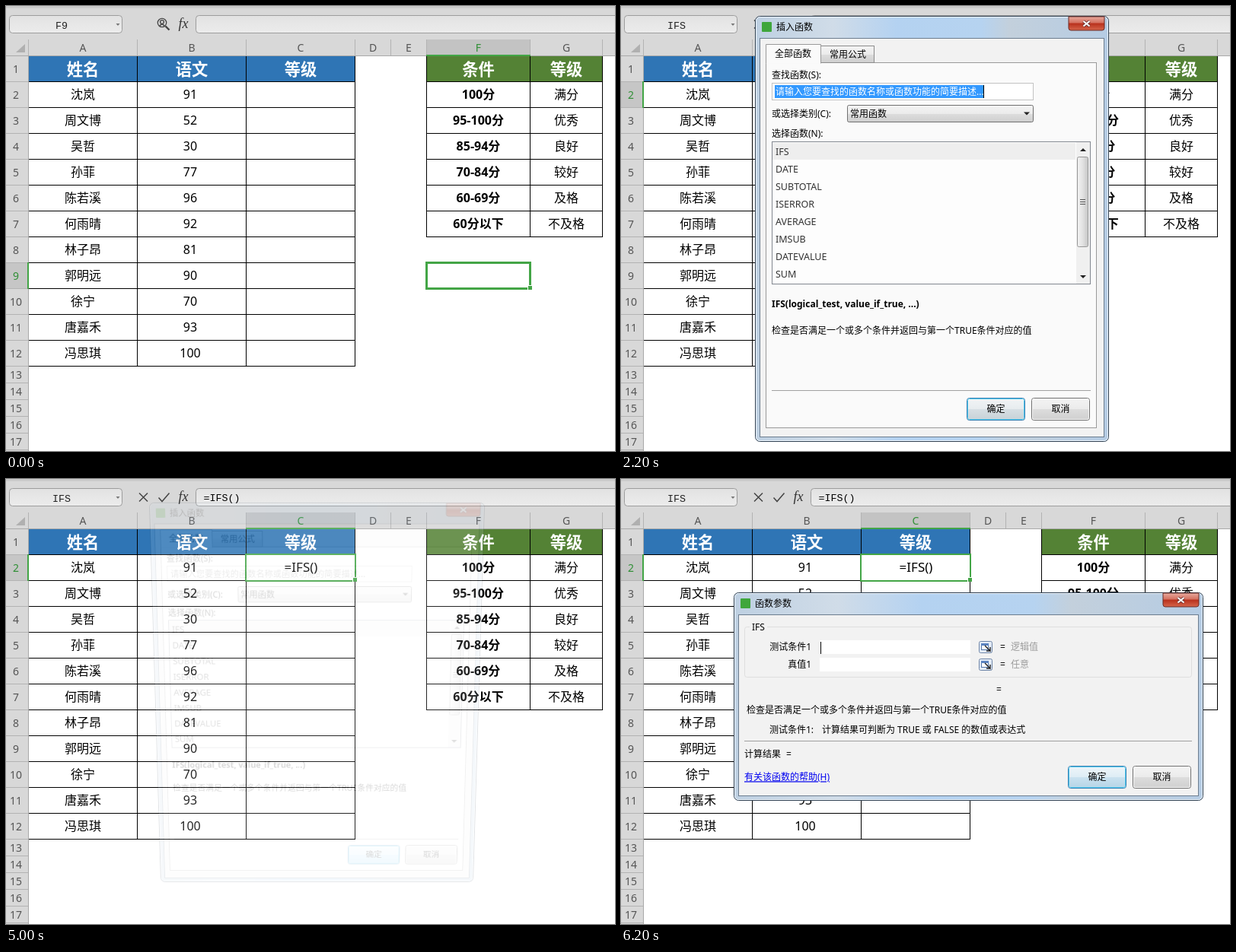
An HTML page for the animation above (6300 ms loop, 800 by 585 pixels).

```html
<!DOCTYPE html>
<html lang="zh-CN">
<head>
<meta charset="utf-8">
<title>IFS</title>
<style>
html, body { margin: 0; width: 100%; height: 100%; overflow: hidden; background: #fff; }
svg { position: absolute; left: 0; top: 0; width: 800px; height: 585px; white-space: pre;
  font-family: "Noto Sans", "Noto Sans CJK SC", "Noto Sans CJK", sans-serif; }
#find { transform-origin: 408.5px 293px; }
#args { transform-origin: 456px 285.5px; }
.mono { font-family: "Liberation Mono", monospace; }
</style>
</head>
<body>
<svg id="sheet" viewBox="0 0 800 585"></svg>
<svg id="find" viewBox="0 0 800 585"></svg>
<svg id="args" viewBox="0 0 800 585"></svg>
<script>
const LOOP = 6300;
const GREEN = '#43a546';
const $ = id => document.getElementById(id);

// Shape helpers: boxes are given by their left, top, right and bottom edges.
const box = (l, t, r, b, fill, more = '') =>
  `<rect x="${l}" y="${t}" width="${r - l}" height="${b - t}" fill="${fill}" ${more}/>`;
const frame = (l, t, r, b, fill, stroke, radius = 0) =>
  box(l + .5, t + .5, r - .5, b - .5, fill, `stroke="${stroke}" rx="${radius}"`);
const line = (x1, y1, x2, y2, color) =>
  `<path d="M${x1} ${y1}L${x2} ${y2}" stroke="${color}"/>`;
const path = (d, more) => `<path d="${d}" ${more}/>`;
// Text is placed by its vertical middle.
const text = (x, y, s, size = 12, fill = '#000', more = '') =>
  `<text x="${x}" y="${y + size * .365}" font-size="${size}" fill="${fill}" ${more}>${s}</text>`;
const mid = (x, y, s, size, fill, more = '') =>
  text(x, y, s, size, fill, 'text-anchor="middle" ' + more);
const group = (id, body) => `<g id="${id}">${body}</g>`;
const gradient = (id, stops, across = false) =>
  `<linearGradient id="${id}" ${across ? '' : 'x2="0" y2="1"'}>` +
  stops.map(([at, c]) => `<stop offset="${at}" stop-color="${c}"/>`).join('') + '</linearGradient>';
const bold = 'font-weight="700"';

// Shared fills live in the worksheet, the only layer that is never hidden.
const defs = '<defs>' +
  gradient('field', [[0, '#e2e2e2'], [1, '#ececec']]) +
  gradient('metal', [[0, '#f4f4f4'], [.5, '#ebebeb'], [.5, '#dddddd'], [1, '#cfcfcf']]) +
  gradient('hot', [[0, '#eaf6fd'], [.5, '#d5eefc'], [.5, '#bee6fd'], [1, '#a3d8f5']]) +
  gradient('red', [[0, '#e7a99e'], [.45, '#d4705f'], [.5, '#b8301c'], [1, '#d6654b']]) +
  gradient('thumb', [[0, '#f3f3f3'], [.5, '#e2e2e2'], [1, '#c6c6c6']], true) +
  gradient('glass', [[0, '#bed0e2'], [.22, '#d0dce8'], [.4, '#b4d2f1'], [.64, '#b6d3f0'], [.72, '#c3d0dc'], [1, '#b5cce4']], true) +
  '</defs>';

// ---- Worksheet ----
const cols = [29, 172, 315, 458, 505, 552, 688, 783];
const rowEdge = r => r === 0 ? 65 : r <= 12 ? 99 + 34 * (r - 1) : 473 + 22 * (r - 12);
const rowMid = r => (rowEdge(r - 1) + rowEdge(r)) / 2 + .5;
const colMid = c => (cols[c] + cols[c + 1]) / 2 + .5;
const pupils = [['沈岚', 91], ['周文博', 52], ['吴哲', 30], ['孙菲', 77], ['陈若溪', 96], ['何雨晴', 92],
  ['林子昂', 81], ['郭明远', 90], ['徐宁', 70], ['唐嘉禾', 93], ['冯思琪', 100]];
const grades = [['100分', '满分'], ['95-100分', '优秀'], ['85-94分', '良好'],
  ['70-84分', '较好'], ['60-69分', '及格'], ['60分以下', '不及格']];

const colName = (c, color) => mid(colMid(c), 54.5, 'ABCDEFG'[c], 14, color);
const rowName = (r, color) => mid(13, rowMid(r) + .5, r, 14, color);

// The sheet's own edges stay grey, so no border is drawn above row 1 or left of column A.
function table(from, to, rows, fill, titles) {
  const l = cols[from] + .5, r = cols[to] + .5;
  let s = box(l + .5, 66, r, 99, fill);
  for (let i = 1; i <= rows; i++) s += line(l + .5, rowEdge(i) + .5, r, rowEdge(i) + .5, '#000');
  for (let c = Math.max(from, 1); c <= to; c++) s += line(cols[c] + .5, 66, cols[c] + .5, rowEdge(rows) + 1, '#000');
  titles.forEach((name, i) => s += mid(colMid(from + i), 83, name, 21.3, '#fff', bold));
  return s;
}

function selection(c, r, width) {
  const l = cols[c], t = rowEdge(r - 1), right = cols[c + 1], b = rowEdge(r), h = width / 2;
  return box(l + 1, 44, right, 64, '#c3c3c3') + box(l, 64, right + 1, 66, GREEN) + colName(c, '#2f8f35') +
    box(0, t + 1, 28, b, '#c6c6c6') + box(28, t, 30, b + 1, GREEN) + rowName(r, '#2f8f35') +
    box(l - 1 + h, t - 1 + h, right + 2 - h, b + 2 - h, 'none', `stroke="${GREEN}" stroke-width="${width}"`) +
    box(right - 3, b - 4, right + 3, b + 2, '#fff') + box(right - 2, b - 3, right + 3, b + 2, GREEN);
}

function drawSheet() {
  let s = defs + box(0, 0, 800, 585, '#fff') + box(0, 0, 800, 66, '#d8d8d8') + box(0, 0, 800, 3, '#cbcbcb') +
    box(0, 66, 29, 585, '#d8d8d8') +
    frame(4, 12, 153, 36, 'url(#field)', '#9d9d9d', 4) + path('M144.5 23h5l-2.5 3z', 'fill="#777"') +
    frame(249, 12, 820, 36, 'url(#field)', '#9d9d9d', 4) +
    path('M25 50v11H13z', 'fill="#b0b0b0"') +
    line(0, 65.5, 800, 65.5, '#a9a9a9') + line(29.5, 66, 29.5, 585, '#a9a9a9');
  cols.forEach((x, c) => {
    s += line(x + .5, 44, x + .5, 65, '#b3b3b3');
    if (c < 7) s += colName(c, '#555');
  });
  for (let r = 1; r <= 17; r++)
    s += line(0, rowEdge(r) + .5, 29, rowEdge(r) + .5, '#b3b3b3') + rowName(r, '#555');
  s += table(0, 3, 12, '#2f75b5', ['姓名', '语文', '等级']) + table(5, 7, 7, '#548235', ['条件', '等级']);
  pupils.forEach(([name, mark], i) => {
    s += mid(colMid(0), rowMid(i + 2), name, 16) + mid(colMid(1) - 2, rowMid(i + 2), mark, 16);
  });
  grades.forEach(([rule, grade], i) => {
    s += mid(colMid(5), rowMid(i + 2), rule, 16, '#000', bold) + mid(colMid(6), rowMid(i + 2), grade, 16);
  });
  s += group('selF9', selection(5, 9, 3)) + group('selC2', selection(2, 2, 3)) +
    group('editC2', selection(2, 2, 2) + '<text id="cell" x="387.5" y="122" font-size="17" text-anchor="middle"></text>') +
    group('lens', '<g fill="none" stroke="#444" stroke-width="1.3"><circle cx="205" cy="22" r="5.7"/>' +
      '<circle cx="205" cy="21" r="2.4"/><path d="M202 26q3-4 6 0"/><path d="M209.5 26.5l5 5" stroke-width="2.4"/></g>') +
    group('marks', '<g fill="none" stroke="#444" stroke-width="1.5"><path d="M175 18.5l11 11M186 18.5l-11 11"/>' +
      '<path d="M200.5 24.5l4.5 5 9.5-11"/></g>') +
    box(221, 12, 245, 36, '#a0a0a0', 'id="fxBack" rx="4"') +
    '<text x="233" y="29" font-size="18" fill="#333" font-style="italic" text-anchor="middle" font-family="Liberation Serif, serif">fx</text>' +
    '<text id="nameBox" class="mono" x="73" y="29.5" font-size="13.333" fill="#222" text-anchor="middle"></text>' +
    '<text id="formula" class="mono" x="259.5" y="29" font-size="13.333"></text>';
  $('sheet').innerHTML = s;
}

// ---- Dialogs ----
const pushButton = (l, t, label, glow) => {
  const r = l + 77, b = t + 30;
  return frame(l, t, r, b, 'url(#metal)', glow ? '#3c7fb1' : '#707070', 3) +
    (glow ? box(l + 1, t + 1, r - 1, b - 1, 'url(#hot)', `id="${glow}" rx="2"`) : '') +
    box(l + 1.5, t + 1.5, r - 1.5, b - 1.5, 'none', `rx="2" stroke="${glow ? '#4cc8ee' : '#fafafa'}"`) +
    mid((l + r) / 2, t + 14.5, label);
};

function dialogFrame(l, t, r, b, title) {
  const x = r - 53, cx = r - 29.5, cy = t + 10;
  const cross = `M${cx - 4} ${cy - 3}l8 6.5M${cx + 4} ${cy - 3}l-8 6.5`;
  return frame(l, t, r, b, 'url(#glass)', '#2f4052', 6) +
    box(l + 1.5, t + 1.5, r - 1.5, b - 1.5, 'none', 'rx="5" stroke="#eef5fb"') +
    frame(l + 6, t + 29, r - 6, b - 6, '#f2f2f2', '#6c7d8f') +
    box(l + 9, t + 8, l + 22, t + 21, '#3fa63c', 'rx="1"') + text(l + 28, t + 14.5, title) +
    path(`M${x} ${t + 1}h47v15q0 3-3 3h-41q-3 0-3-3z`, 'fill="url(#red)" stroke="#6b2a25"') +
    path(cross, 'stroke="#6b3030" stroke-width="4"') + path(cross, 'stroke="#fff" stroke-width="2.2"');
}

const triangle = (x, y, dir) => path(`M${x - 4} ${y - 2 * dir}h8l-4 ${4 * dir}z`, 'fill="#222"');

function drawFind() {
  const hint = '请输入您要查找的函数名称或函数功能的简要描述...';
  let s = dialogFrame(176, 13, 641, 573, '插入函数') +
    frame(190, 74, 625, 555, '#fafafa', '#9a9a9a') +
    frame(262, 52, 333, 75, 'url(#metal)', '#8c8c8c') +
    box(263, 53, 332, 74, 'url(#hot)', 'id="tabHot"') + mid(298, 63.5, '常用公式') +
    path('M190.5 75.5v-25h72v25', 'fill="#fafafa" stroke="#9a9a9a"') + mid(226, 62.5, '全部函数') +
    text(198, 91, '查找函数(S):') + frame(198, 101, 542, 124, '#fff', '#c2c2c2') +
    text(203, 112.5, hint, 12, '#777', 'id="hint"') +
    group('picked', box(202, 104, 476, 121, '#3399ff') + text(203, 112.5, hint, 12, '#fff')) +
    box(476, 104, 477, 121, '#000', 'id="findCaret"') +
    text(198, 142, '或选择类别(C):') + frame(297, 130, 542, 153, 'url(#metal)', '#707070', 2) +
    text(301, 142, '常用函数') + triangle(533, 141.5, 1) +
    text(198, 168, '选择函数(N):') + frame(198, 178, 617, 366, '#fdfdfd', '#828790') +
    box(199, 180, 597, 202, '#eeeeee') + box(598, 179, 616, 365, '#f0f0f0') +
    triangle(607, 189, -1) + triangle(607, 356, 1) + frame(599, 198, 614, 317, 'url(#thumb)', '#979797', 2);
  for (let y = 254; y < 262; y += 3) s += line(603, y + .5, 610, y + .5, '#555');
  ['IFS', 'DATE', 'SUBTOTAL', 'ISERROR', 'AVERAGE', 'IMSUB', 'DATEVALUE', 'SUM'].forEach((name, i) => {
    s += text(203, 191.5 + 23 * i, name, 12.5, '#333');
  });
  s += text(198, 392, 'IFS(logical_test, value_if_true, ...)', 12, '#000', bold) +
    text(198, 427, '检查是否满足一个或多个条件并返回与第一个TRUE条件对应的值') +
    line(198, 505.5, 617, 505.5, '#a0a0a0') +
    pushButton(454, 515, '确定', 'findGlow') + pushButton(539, 515, '取消');
  $('find').innerHTML = s;
}

function drawArgs() {
  let s = dialogFrame(148, 149, 765, 423, '函数参数') +
    frame(162, 194, 750, 261, 'none', '#dedede', 3) + box(169, 192, 192, 198, '#f2f2f2') + text(172, 195, 'IFS');
  [['测试条件1', '逻辑值'], ['真值1', '任意']].forEach(([label, kind], i) => {
    const y = 221 + 23 * i;
    s += text(250, y, label, 12, '#000', 'text-anchor="end"') + box(261, y - 9, 459, y + 9, '#fff') +
      frame(470, y - 8, 488, y + 8, '#e4ecf7', '#6f86a8', 2) + frame(473, y - 5, 483, y + 4, '#fff', '#5577aa') +
      box(473, y - 5, 483, y - 2, '#5b83c0') + path(`M478 ${y - 2}l7 7v-5M485 ${y + 5}h-5`, 'fill="none" stroke="#222" stroke-width="1.4"') +
      text(498, y, '=') + text(512, y, kind, 12, '#9c9c9c');
  });
  s += box(262, 214, 263, 230, '#000', 'id="argsCaret"') + text(493, 277, '=') +
    text(165, 304, '检查是否满足一个或多个条件并返回与第一个TRUE条件对应的值') +
    text(195, 330, '测试条件1:') + text(264, 330, '计算结果可判断为 TRUE 或 FALSE 的数值或表达式') +
    line(162, 344.5, 750, 344.5, '#a0a0a0') + text(162, 362, '计算结果') + text(217, 362, '=') +
    text(162, 392, '有关该函数的帮助(H)', 12, '#0000f0', 'text-decoration="underline"') +
    pushButton(587, 377, '确定', 'argsGlow') + pushButton(672, 377, '取消');
  $('args').innerHTML = s;
}

// ---- Timeline: [start in ms, value], each value holds until the next ----
const selected = [[0, 'selF9'], [900, 'selC2'], [1900, 'editC2']];
const fxShade = [[0, 0], [1500, .45], [1700, 1], [1900, 0]];
const findOpen = [[0, 0], [1900, .3], [2000, .7], [2100, .92], [2200, 1], [4900, .55], [5000, .15], [5100, 0]];
const argsOpen = [[0, 0], [5100, .3], [5200, .7], [5300, .92], [5400, 1]];
const tabHover = [[0, 0], [2400, .5], [2500, .8], [2600, 0]];
const findBlink = [[0, 1], [2400, 0], [2800, 1], [3000, 0]];
const argsBlink = [[0, 1], [5600, 0], [6100, 1]];
const findPulse = [[0, .2], [2300, .35], [2500, .5], [2600, .6], [2800, .7], [3000, .55], [3100, .45], [3300, .35],
  [3400, .25], [3600, .15], [3900, .25], [4100, .4], [4200, .6], [4300, .75], [4400, .9], [4500, 1]];
const argsPulse = [[0, .15], [5400, .25], [5500, .35], [5800, .45], [5900, .55], [6100, .7], [6200, .6]];

const at = (steps, t) => steps.filter(([start]) => start <= t).pop()[1];
const show = (id, on) => $(id).style.display = on ? '' : 'none';
const fade = (id, v) => $(id).style.opacity = v;

// A window swings in from slightly behind the screen, its lower edge farthest away.
function pose(id, p, tilt) {
  const rest = 1 - p;
  show(id, p > 0);
  fade(id, p);
  $(id).style.transform = p === 1 ? 'none' :
    `perspective(1700px) translateY(${-4.5 * rest}px) rotateX(${-tilt * rest}deg) scale(${1 - .1 * rest})`;
}

function render(t) {
  const sel = at(selected, t), editing = sel === 'editC2';
  ['selF9', 'selC2', 'editC2'].forEach(id => show(id, id === sel));
  show('lens', !editing);
  show('marks', editing);
  $('nameBox').textContent = editing ? 'IFS' : sel.slice(3);
  $('formula').textContent = $('cell').textContent = !editing ? '' : t < 4900 ? '=' : '=IFS()';
  fade('fxBack', at(fxShade, t));
  pose('find', at(findOpen, t), 16);
  pose('args', at(argsOpen, t), 22);
  fade('tabHot', at(tabHover, t));
  show('picked', t < 3000);
  show('hint', t >= 3000);
  show('findCaret', at(findBlink, t));
  show('argsCaret', at(argsBlink, t));
  fade('findGlow', at(findPulse, t));
  fade('argsGlow', at(argsPulse, t));
}

drawSheet();
drawFind();
drawArgs();
const begin = performance.now();
let last = -1;
function tick() {
  const t = Math.floor((performance.now() - begin) % LOOP / 100) * 100;
  if (t !== last) render(last = t);
  requestAnimationFrame(tick);
}
tick();
</script>
</body>
</html>
```
